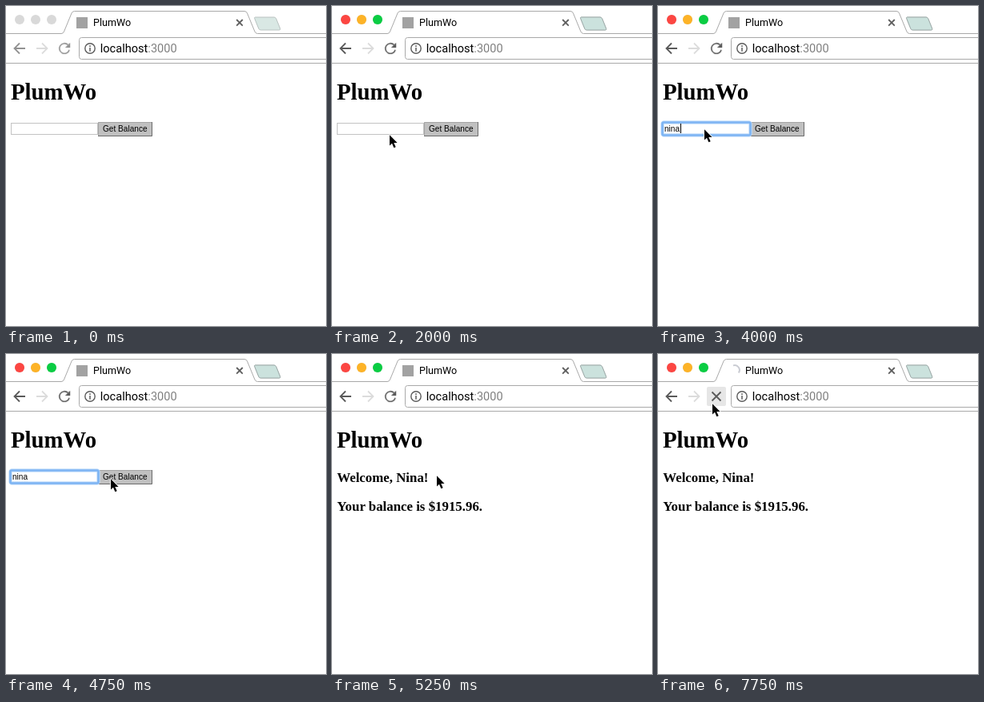
An HTML page that plays this animation: 400 px wide and 400 px high, repeating every 8000 ms.

```html
<!DOCTYPE html>
<html lang="en">
<head>
<meta charset="utf-8">
<title>Balance demo</title>
<style>
  html, body { margin: 0; width: 100%; height: 100%; overflow: hidden; background: #fff; }
  svg { display: block; width: 100vw; height: 100vh; }

  .ui { font-family: Roboto, sans-serif; }
  .field { font: 10.1px "Liberation Sans", Arial, sans-serif; }
  .page { font-family: "Liberation Serif", "Times New Roman", serif; font-weight: bold; }
  .line { fill: none; stroke: #a9a9a9; }
  .icon { fill: none; stroke: currentColor; stroke-width: 1.8; }
  .ring { fill: none; stroke: #7db4f3; stroke-width: 2.6; }
  .glow { fill: none; stroke: #c4defa; stroke-width: 4.4; }

  /* Every change is a hard cut on an 8 s clock. */
  .cut { animation: 8s step-end infinite; }
  .tools { color: #929292; animation-name: tools; }
  .active { animation-name: active; }
  .form { animation-name: form; }
  .result { animation-name: result; }
  .focus { animation-name: focus; }
  .caret { animation-name: caret; }
  .typed { animation-name: typed; }
  .end-caret { animation-name: end-caret; }
  .press { animation-name: press; }
  .hover { animation-name: hover; }
  .idle { animation-name: idle; }
  .loading { animation-name: loading; }
  .pointer { animation-name: pointer; }

  @keyframes tools { 0% { color: #929292 } 25% { color: #5a5a5a } 100% { color: #5a5a5a } }
  @keyframes active { 0% { opacity: 0 } 25%, 100% { opacity: 1 } }
  @keyframes form { 0% { opacity: 1 } 65.625%, 100% { opacity: 0 } }
  @keyframes result { 0% { opacity: 0 } 65.625%, 100% { opacity: 1 } }
  @keyframes focus { 0% { opacity: 0 } 37.5% { opacity: 1 } 62.5%, 100% { opacity: 0 } }
  @keyframes caret { 0% { opacity: 0 } 37.5% { opacity: 1 } 43.75%, 100% { opacity: 0 } }
  @keyframes typed { 0% { opacity: 0 } 50%, 100% { opacity: 1 } }
  @keyframes end-caret { 0% { opacity: 0 } 50% { opacity: 1 } 56.25%, 100% { opacity: 0 } }
  @keyframes press { 0% { opacity: 0 } 62.5% { opacity: 1 } 65.625%, 100% { opacity: 0 } }
  @keyframes hover { 0% { opacity: 0 } 81.25%, 100% { opacity: 1 } }
  @keyframes idle { 0% { opacity: 1 } 96.875%, 100% { opacity: 0 } }
  @keyframes loading { 0% { opacity: 0 } 96.875%, 100% { opacity: 1 } }
  @keyframes pointer {
    0% { transform: translate(-40px, 205px) }
    3.125% { transform: translate(62px, 205px) }
    6.25% { transform: translate(71px, 163px) }
    9.375% { transform: translate(71px, 162px) }
    12.5% { transform: translate(71px, 160px) }
    31.25% { transform: translate(66px, 158px) }
    34.375% { transform: translate(57px, 153px) }
    56.25% { transform: translate(117px, 167px) }
    59.375% { transform: translate(130px, 155px) }
    62.5% { transform: translate(130px, 151px) }
    81.25%, 100% { transform: translate(67px, 61px) }
  }
</style>
</head>
<body>
<svg viewBox="0 0 400 400">
  <defs>
    <path id="plus-tab" d="M311.5 14H335q2 0 2.7 1.8l5 12.400q.7 1.800-1.200 1.800H318.500q-2 0-2.700-1.800l-5-12.400q-.7-1.800.7-1.800z"/>
  </defs>
  <rect width="400" height="400" fill="#fff"/>

  <!-- Tab strip -->
  <path class="line" d="M0 34.500H69Q71.500 34.500 72.500 32L82 9Q83 6.500 85.500 6.500H298Q300.500 6.500 301.500 9L311 32Q312 34.500 314.500 34.500H400"/>
  <g fill="#d9d9d9">
    <circle cx="17" cy="17" r="6"/>
    <circle cx="37" cy="17" r="6"/>
    <circle cx="57" cy="17" r="6"/>
  </g>
  <use href="#plus-tab" fill="#d9e8e4" stroke="#b9c2c0"/>
  <g class="cut active">
    <circle cx="17" cy="17" r="6" fill="#fc4642"/>
    <circle cx="37" cy="17" r="6" fill="#fdb327"/>
    <circle cx="57" cy="17" r="6" fill="#0acd43"/>
    <use href="#plus-tab" fill="#cbe2dd" stroke="#9fabaa"/>
  </g>
  <rect class="cut idle" x="88" y="14" width="14" height="14" fill="#a2a2a2"/>
  <path class="cut loading" d="M94 14.400A6 6 0 0 1 100.800 23.500" fill="none" stroke="#c9cbd2" stroke-width="2"/>
  <text class="ui" x="109" y="25" font-size="12.600">PlumWo</text>
  <path class="icon" color="#5e5e5e" d="M288.200 17l7.600 7.600m0-7.600l-7.600 7.600"/>

  <!-- Toolbar -->
  <path class="line" d="M0 71.500H400"/>
  <rect class="line" x="91.500" y="39.500" width="320" height="27" rx="3"/>
  <rect class="cut hover" x="61" y="41" width="24" height="24" rx="2" fill="#e6e6e6"/>
  <path class="icon" color="#dcdcdc" d="M38 53H51M45 46.500L51.500 53L45 59.500"/>
  <g class="cut tools">
    <path class="icon" d="M24 53H11M17 46.500L10.500 53L17 59.500"/>
    <g class="cut idle">
      <g transform="translate(62.200 42.200) scale(.9)">
        <path class="icon" stroke-width="2" d="M18.800 14A7 7 0 1 1 16.950 7.050"/>
        <path d="M20 4v7h-7z" fill="currentColor"/>
      </g>
    </g>
    <path class="icon cut loading" d="M67.500 47.500l11 11m0-11l-11 11"/>
  </g>
  <g color="#5a5a5a">
    <circle class="icon" cx="105" cy="53" r="6.200" style="stroke-width:1.400"/>
    <path class="icon" style="stroke-width:1.500" d="M105 49.300v1.600m0 1.200v4.600"/>
  </g>
  <text class="ui" x="117.700" y="58" font-size="14.600">localhost<tspan fill="#808080">:3000</tspan></text>

  <!-- Page -->
  <text class="page" x="6" y="117" font-size="28.800">PlumWo</text>
  <g class="cut form">
    <rect x="6.500" y="146.500" width="108" height="14" fill="#fff" stroke="#c3c3c3"/>
    <rect x="115" y="145" width="68" height="18" fill="#c0c0c0"/>
    <path d="M115.500 162V145.500H182" fill="none" stroke="#a4a4a4"/>
    <path d="M115 162.500H182.500V145" fill="none" stroke="#6c6c6c"/>
    <g class="cut focus">
      <rect class="glow" x="5.500" y="145.500" width="110" height="16" rx="2"/>
      <rect class="ring" x="5.500" y="145.500" width="110" height="16" rx="1.500"/>
    </g>
    <g class="cut press">
      <rect class="glow" x="113.500" y="143.500" width="71" height="20.500" rx="2"/>
      <rect class="ring" x="113.500" y="143.500" width="71" height="20.500" rx="1.500"/>
    </g>
    <rect class="cut caret" x="8" y="147" width="1" height="12"/>
    <text class="field cut typed" x="8" y="157">nina</text>
    <rect class="cut end-caret" x="28" y="147" width="1" height="12"/>
    <text class="field" x="121" y="157">Get Balance</text>
  </g>
  <g class="page cut result" font-size="16.850">
    <text x="6.300" y="160">Welcome, Nina!</text>
    <text x="6.300" y="196">Your balance is $1915.96.</text>
  </g>

  <g class="cut pointer">
    <path d="M1 1.200V14.600L4 11.800L6.400 17.300L8.700 16.300L6.300 10.900H10.600z" stroke="#fff" stroke-width="1.600" stroke-linejoin="round" paint-order="stroke"/>
  </g>
</svg>
</body>
</html>
```
